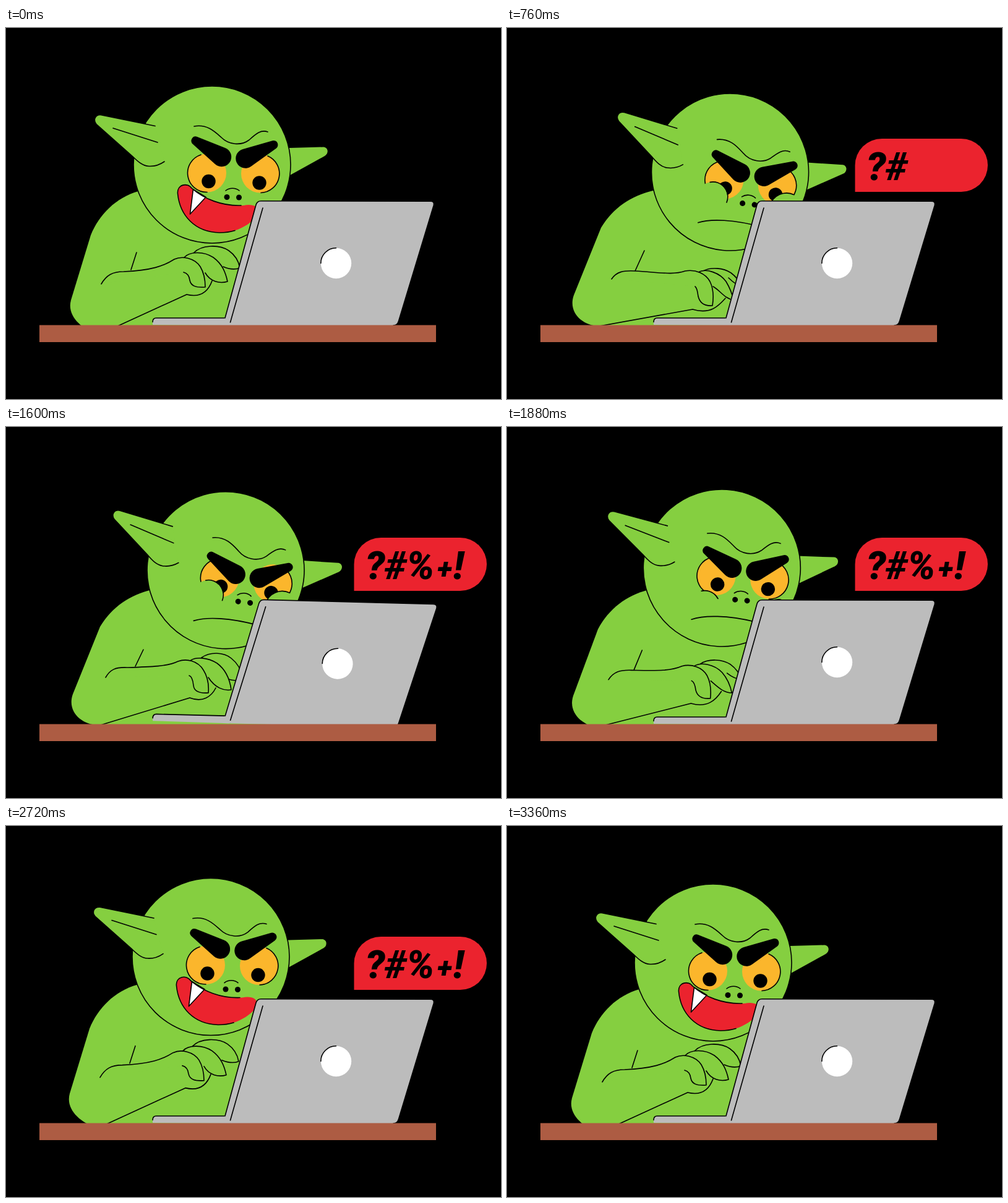
Animation of 800 by 600 pixels, one loop 3400 ms. Source, as an HTML page:

```html
<!DOCTYPE html>
<html lang="en">
<head>
<meta charset="utf-8">
<title>Angry goblin typing</title>
<style>
  html, body { margin: 0; width: 100%; height: 100%; overflow: hidden; background: #000; }
  svg { display: block; width: 800px; height: 600px; }
  .skin { fill: #85cf40; }
  .line { fill: none; }
  .line, .ink { stroke: #000; stroke-width: 1.6; stroke-linecap: round; stroke-linejoin: round; }
  .eye { fill: #fbb62c; }
  .red { fill: #eb232e; }
  .metal { fill: #bcbcbc; }
  text { font: italic 900 63px Roboto, Inter, sans-serif; }
  .plus { font-size: 46px; }
</style>
</head>
<body>
<svg viewBox="0 0 800 600">
  <defs>
    <clipPath id="eyeArea"><circle cx="325" cy="235" r="37"/><circle cx="411" cy="235" r="37"/></clipPath>
  </defs>
  <rect width="800" height="600"/>

  <g id="torso">
    <path id="body" class="skin"/>
    <path id="crease" class="line"/>
  </g>

  <g id="head">
    <path class="skin" d="M440 194.500L513 192.500C521 193 522 203 515 207L450 243Z"/>
    <circle class="skin ink" cx="333" cy="221" r="127"/>
    <path class="skin ink" d="M241 158.500L154 140.700C145 139.500 140 148 146 155.500L204.500 207.500C213 216 221 223 231 223.500C241 224 249 221 256 216"/>
    <path class="line" d="M173 162L245 185"/>

    <circle class="eye" cx="325" cy="234.500" r="31"/>
    <circle class="eye" cx="411" cy="235.500" r="31"/>
    <path class="line" d="M315 205A31 31 0 0 0 325 265.500M423 207A31 31 0 0 1 412 266.500"/>
    <circle cx="327.500" cy="248" r="11.200"/>
    <circle cx="409.500" cy="250.500" r="11.200"/>
    <g clip-path="url(#eyeArea)">
      <g id="lids">
        <circle class="skin" cx="308.300" cy="263.500" r="24"/>
        <circle class="skin" cx="429.800" cy="274.300" r="28"/>
        <path class="line" d="M302.300 240.300A24 24 0 0 1 332 270.400M402.200 268.800A28 28 0 0 1 439.400 248"/>
      </g>
    </g>

    <path id="forehead" class="line" d="M304 159C325 155 338 168 348 177C360 189 380 191 393 181C404 171 412 164 423 168"/>
    <g id="brows">
      <path id="browL"/>
      <path id="browR"/>
    </g>

    <g id="nose">
      <circle cx="357" cy="273.500" r="4.500"/>
      <circle cx="376.500" cy="274" r="4.500"/>
      <path class="line" d="M355 263C361 258 371 258 377 263"/>
    </g>

    <g id="laugh">
      <path class="red" d="M384 287C350 288 320 277 300 259C294 250 276 252 277.500 268C281 303 305 330 345 331C354 331 362 330 370 327.500C384 323 396 315 404 306C414 292 402 283 384 287Z"/>
      <path fill="#fff" class="ink" d="M302.500 261L323 273.500L297.500 301Z"/>
      <path class="line" d="M380 287C350 288 320 277 300 259C294 250 276 252 277.500 268C281 303 305 330 345 331C354 331 362 330 370 327.500"/>
    </g>
    <path id="frown" class="line" d="M289 307.200C309 298.700 346 296.700 393 304.700"/>
  </g>

  <g id="hands">
    <path id="far" class="skin ink"/>
    <path id="second" class="skin ink"/>
    <path id="first" class="skin ink"/>
    <path id="palm" class="line"/>
  </g>

  <g id="laptop">
    <path class="metal" d="M237 480V475.500Q237 469 243 469H360V481Z"/>
    <path class="line" d="M237 475.500Q237 469 243 469H354"/>
    <path class="metal" d="M350 481L404 286Q406 279.800 412 279.800L686 280.300Q693 280.300 691 287.500L634.500 474Q632.500 481 626 481Z"/>
    <path class="line" d="M354 469L404 286Q406 279.800 412 279.800L686 280.300Q693 280.300 691 287.500L634.500 474Q632.500 481 626 481M415 291L362.500 476"/>
    <circle cx="533.500" cy="380.500" r="24.700" fill="#fff"/>
    <path class="line" d="M508.800 380.500A24.700 24.700 0 0 1 533.500 355.800"/>
  </g>

  <rect x="54" y="480.500" width="641" height="27.500" fill="#ad5c43"/>

  <g id="bubble">
    <path class="red" d="M562.500 265V222A43.500 43 0 0 1 606 179H734A43 43 0 0 1 734 265Z"/>
    <g id="rant">
      <text x="581" y="246">?</text>
      <text x="612" y="246">#</text>
      <text x="647" y="246">%</text>
      <text x="697" y="245" class="plus">+</text>
      <text x="723" y="246">!</text>
    </g>
  </g>
</svg>

<script>
const LOOP = 3400, STEP = 40, LAUGH = 2160, BOB = 240;
const $ = id => document.getElementById(id);
const lerp = (a, b, k) => a + (b - a) * k;
const clamp = v => Math.max(0, Math.min(1, v));
const smooth = k => (1 - Math.cos(Math.PI * k)) / 2;
const part = (t, a, b) => clamp((t - a) / (b - a));
const move = (id, x, y, extra = '') => $(id).setAttribute('transform', `translate(${x} ${y}) ${extra}`);
const show = (el, on) => { el.style.visibility = on ? 'visible' : 'hidden'; };

// Blends two paths that share the same commands.
const NUM = /-?\d+(\.\d+)?/g;
function mix(a, b, k) {
  const ends = b.match(NUM);
  let i = 0;
  return a.replace(NUM, n => lerp(+n, +ends[i++], k).toFixed(2));
}

// Capsule with a small and a big round end.
function taper(x1, y1, r1, x2, y2, r2) {
  const a = Math.atan2(y2 - y1, x2 - x1);
  const b = Math.acos((r1 - r2) / Math.hypot(x2 - x1, y2 - y1));
  const at = (x, y, r, q) => `${x + r * Math.cos(q)} ${y + r * Math.sin(q)}`;
  return `M${at(x1, y1, r1, a + b)}A${r1} ${r1} 0 0 1 ${at(x1, y1, r1, a - b)}` +
    `L${at(x2, y2, r2, a - b)}A${r2} ${r2} 0 1 1 ${at(x2, y2, r2, a + b)}Z`;
}
$('browL').setAttribute('d', taper(306.5, 182.5, 7, 348.5, 208.5, 15.7));
$('browR').setAttribute('d', taper(432.5, 189, 7, 387, 211, 15.7));

const relaxed = {
  body: 'M145 494C122 486 98 466 105 440L137 335C150 302 178 274 214 264L330 250L420 335L436 500Z',
  crease: 'M211 363L202 391',
  far: 'M303 364C316 350 345 350 360 360C370 367 376 377 378 388C368 392 358 389 351 386',
  second: 'M288 371C296 362 318 360 335 371C350 382 355 396 358 410C345 414 330 410 322 396',
  first: 'M154 414C162 400 172 394 190 394C235 392 255 385 272 374C285 368 305 372 314 386C320 396 322 408 322 419C308 420 299 418 297 408C296 399 291 396 287 395',
  palm: 'M333 409C326 428 312 436 292 431L150 496'
};
const press = {
  body: 'M150 482C122 482 98 460 108 432L152 323C172 290 200 272 236 263L350 255L420 335L436 500Z',
  crease: 'M222 360L207 393',
  far: 'M317 393C330 386 350 388 362 396C370 402 376 410 380 418C372 416 364 410 358 404',
  second: 'M309 395C322 388 344 396 354 410C360 420 364 430 366 440C352 438 344 424 333 418',
  first: 'M169 406C177 394 188 392 207 393C245 395 268 400 288 393C305 390 321 397 328 410C334 422 334 436 332 449C320 450 312 446 309 434C308 426 307 420 304 418',
  palm: 'M353 437C343 448 330 464 300 455L100 491'
};
const farTap = {
  ...press,
  far: 'M321 391C328 374 350 366 380 371C386 374 388 390 388 400C378 402 360 400 350 396',
  second: 'M310 394C322 388 342 394 354 404C364 414 366 432 362 447C346 446 338 430 334 404'
};
const lift = {
  body: press.body,
  crease: 'M222 360L209 387',
  far: 'M316 373C330 363 352 364 364 374C374 382 380 392 382 404C374 412 366 410 360 408',
  second: 'M299 377C307 372 325 372 341 382C356 393 362 410 364 425C352 427 338 422 327 405',
  first: 'M161 405C168 393 176 388 196 389C235 388 262 387 278 379C292 374 310 378 319 393C326 404 328 418 327 430C313 431 304 428 303 418C302 408 299 403 296 402',
  palm: 'M339 422C332 436 318 446 297 438L130 489'
};

// time, head x, head y, tilt, hunch, eased
const keys = [
  [0, 0, 0, 0, 0, 1],
  [200, -18, -8, -10, 0, 1],
  [280, -18, -8, -10, 0, 1],
  [540, 28.8, 12.4, 5.3, 1, 0],
  [760, 27.5, 12, 5.3, 1, 0],
  [1240, 24.2, 11.2, 5.3, 1, 0],
  [1600, 22, 10.6, 5.3, 1, 0],
  [1700, 21.4, 10.4, 5.3, 1, 1],
  [LAUGH, 0, 0, 0, 0, 0],
  [LOOP, 0, 0, 0, 0, 0]
];
function pose(t) {
  const i = keys.findIndex(k => k[0] > t);
  const a = keys[i - 1], b = keys[i];
  const raw = part(t, a[0], b[0]);
  const k = a[5] ? smooth(raw) : raw;
  return [1, 2, 3, 4].map(c => lerp(a[c], b[c], k));
}

const wave = (t, period) => Math.cos(2 * Math.PI * t / period);

function draw(t) {
  const [x, y, tilt, hunch] = pose(t);
  const bob = t > LAUGH && t < 3360 ? (1 - wave(t - LAUGH, BOB)) / 2 : 0;
  const typing = t >= 560 && t <= 1680;
  const near = typing ? Math.max(0, wave(t, 160)) : 0;
  const far = typing ? Math.max(0, -wave(t - 120, 320)) : 0;

  for (const id in relaxed) {
    const typed = mix(mix(press[id], farTap[id], far), lift[id], near);
    $(id).setAttribute('d', mix(relaxed[id], typed, hunch));
  }

  const lean = Math.min(0, x) * 0.4;
  const bx = lean - 2.7 * bob, by = lean * 0.5 - 9.8 * bob;
  move('torso', bx, by);
  move('hands', bx, by);
  move('head', x - 2.7 * bob, y - 12.6 * bob, `rotate(${tilt} 333 221.5)`);
  const scowl = 11.8 + 6 * part(t, 700, 1600);
  move('forehead', 3.2 * hunch, 11.5 * hunch);
  move('brows', 1.2 * hunch, scowl * hunch);
  move('nose', 0.7 * hunch, -4 * hunch);
  move('lids', 0, 60 * (1 - hunch));
  show($('laugh'), hunch < 0.5);
  show($('frown'), hunch >= 0.5);
  move('laptop', 0, 0, `rotate(${1.4 * near} 432 480)`);

  const enter = smooth(part(t, 380, 540)), leave = smooth(part(t, 3040, 3320));
  move('bubble', 0, 40 * (1 - enter) - 45 * leave);
  $('bubble').setAttribute('opacity', enter * (1 - leave));
  [...$('rant').children].forEach((c, i) => show(c, t >= 560 + 160 * i));
}

const start = performance.now();
function tick() {
  const t = (performance.now() - start) % LOOP;
  draw(Math.floor(t / STEP) * STEP);
  requestAnimationFrame(tick);
}
draw(0);
requestAnimationFrame(tick);
</script>
</body>
</html>
```
